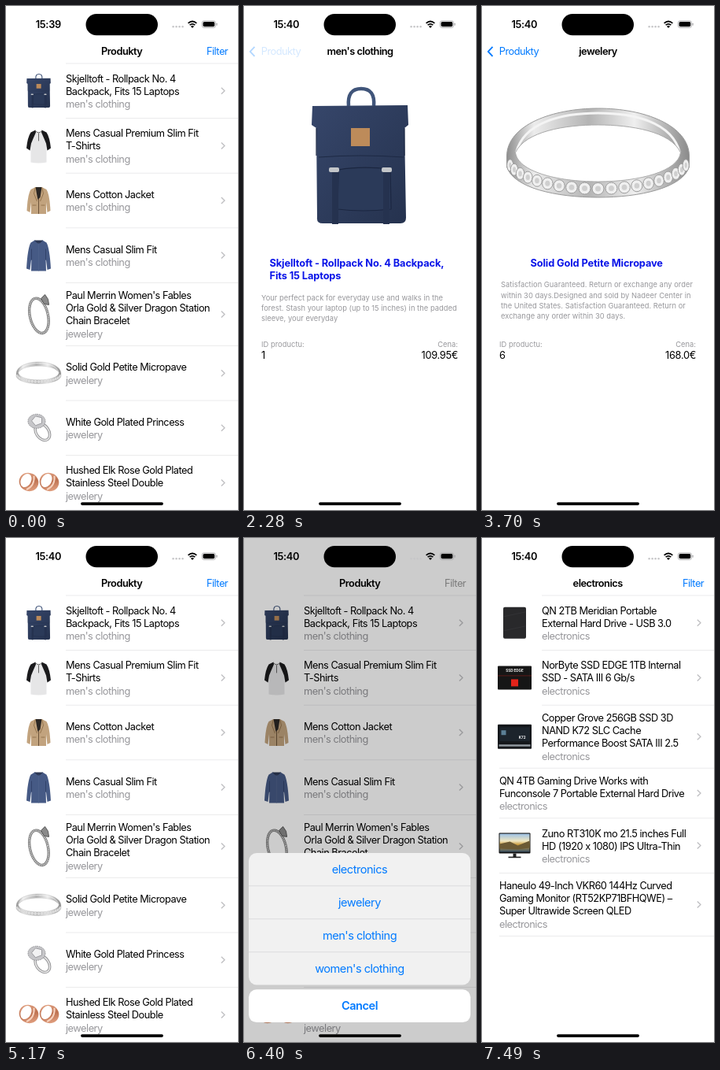
An HTML page that plays this animation: 295x640 px, repeating every 8000 ms.

```html
<!DOCTYPE html>
<html lang="en">
<head>
<meta charset="utf-8">
<style>
  html, body { margin: 0; width: 100%; height: 100%; overflow: hidden; background: #fff; }
  svg { display: block; width: 295px; height: 640px; }
  text { font: 12.8px Inter, "Liberation Sans", sans-serif; letter-spacing: -.5px; white-space: pre; }
  .grey { fill: #97979b; }
  .blue { fill: #007aff; }
  .bold { font-weight: 600; }
  .head { font-weight: 700; letter-spacing: -.12px; fill: #0a14e8; }
  .small { font-size: 9.3px; letter-spacing: .05px; fill: #97979b; }
  .price { letter-spacing: -.3px; }
  .action { font-size: 14.6px; letter-spacing: -.5px; fill: #007aff; }
  .tiny { font-size: 4.5px; font-weight: 700; letter-spacing: 0; fill: #fff; }
</style>
</head>
<body>
<svg id="stage" viewBox="0 0 295 640">
  <defs>
    <linearGradient id="denim" x2="1" y2="1"><stop stop-color="#36466a"/><stop offset="1" stop-color="#25324e"/></linearGradient>
    <linearGradient id="silver"><stop stop-color="#8e8e8e"/><stop offset=".15" stop-color="#ececec"/><stop offset=".45" stop-color="#b4b4b4"/><stop offset=".7" stop-color="#efefef"/><stop offset="1" stop-color="#8a8a8a"/></linearGradient>
    <linearGradient id="rose" x2="1" y2="1"><stop stop-color="#f0b698"/><stop offset=".5" stop-color="#bd7150"/><stop offset="1" stop-color="#eeb192"/></linearGradient>
    <linearGradient id="view" x2="0" y2="1"><stop stop-color="#9cc0e4"/><stop offset=".4" stop-color="#efe6c0"/><stop offset=".6" stop-color="#c99a3c"/><stop offset="1" stop-color="#3c5468"/></linearGradient>
  </defs>
  <g id="list"></g>
  <rect id="shade" width="295" height="640"/>
  <g id="detail"></g>
  <g id="nav"></g>
  <rect id="dim" width="295" height="640"/>
  <g id="status"></g>
  <g id="sheet"></g>
  <rect x="95" y="630.3" width="105" height="3.6" rx="1.8"/>
</svg>
<script>
const $ = id => document.getElementById(id);
const set = (id, attrs) => { for (const k in attrs) $(id).setAttribute(k, attrs[k]); };
const show = (id, on) => set(id, { display: on ? 'inline' : 'none' });
const text = (x, y, s, cls = '', anchor = 'start', extra = '') =>
  `<text x="${x}" y="${y}" class="${cls}" text-anchor="${anchor}" ${extra}>${s.replace('&', '&amp;')}</text>`;
const rect = (x, y, w, h, fill, rx = 0, extra = '') =>
  `<rect x="${x}" y="${y}" width="${w}" height="${h}" rx="${rx}" fill="${fill}" ${extra}/>`;
const path = (d, fill, stroke = 'none', w = 1, extra = '') =>
  `<path d="${d}" fill="${fill}" stroke="${stroke}" stroke-width="${w}" stroke-linejoin="round" ${extra}/>`;
const oval = (x, y, rx, ry, fill, extra = '') =>
  `<ellipse cx="${x}" cy="${y}" rx="${rx}" ry="${ry}" fill="${fill}" ${extra}/>`;
const both = s => s + `<g transform="scale(-1 1)">${s}</g>`;
const place = (x, y, s, scale = 1) => `<g transform="translate(${x} ${y}) scale(${scale})">${s}</g>`;

// Large pictures, centred on 0,0
const backpack = place(-147.5, -190.5,
  path('M133 127Q131 105 149 105Q167 105 165 127', 'none', '#40557a', 4.5) +
  path('M87 127L208 126L209 151L204 155L206 269Q206 276 199 276L100 276Q92 276 93 268L92 155L86 151Z', 'url(#denim)') +
  path('M92 155L92 190M204 155L204 190M95 192Q148 188 203 192', 'none', '#1d2944', 1.2) +
  path('M120 208Q148 203 186 207L187 258Q150 262 119 258Z', '#2b3a59', '#1b2640', 1.2) +
  rect(112, 206, 8, 71, '#25324f') + rect(177, 206, 8, 71, '#25324f') +
  rect(108, 205, 13, 6, '#c3c6c9', 2) + rect(175, 205, 13, 6, '#c3c6c9', 2) +
  rect(136, 155, 24, 23, '#bd8b5a'));

let stones = '';
for (let i = -9; i <= 9; i++) {
  const a = i * .148, c = Math.cos(a), x = 115 * Math.sin(a), y = 5 + 39 * c;
  stones += oval(x, y, 3 + 4.5 * c, 7.5, '#f0f0f0', 'stroke="#9c9c9c"') + oval(x, y, 1 + 2.5 * c, 3.5, '#cfcfcf');
}
const ring =
  path('M-116 3C-116-37-57-58 0-58C58-58 116-37 116 3L116 16C108 43 53 55 0 55C-53 55-108 43-116 16Z', 'url(#silver)', '#999') +
  path('M-104-2C-94-41-45-52 0-52C45-52 94-41 104-2', 'none', '#f4f4f4', 3) +
  path('M-105-2C-92-29-42-37 0-37C42-37 92-29 105-2C102 22 53 35 0 35C-53 35-102 22-105-2Z', '#fff', '#aaa') + stones;

// Small pictures, centred on 0,0
const raglan = path('M-5-18L5-18L10-8L10 21Q0 23-10 21L-10-8Z', '#e6e6e7') +
  both(path('M-4-20L-10-17Q-14-11-15.5 3L-11 6L-9.5-3L-7-9L-3.5-17Z', '#1a1a1c')) +
  path('M-4-19Q0-14 4-19M0-16V-6', 'none', '#666');
const jacket = both(path('M-4-17L-10-14Q-14-8-15 13L-11 15L-9.5 2L-9.5 17L.3 17L.3-12Z', '#c2a37e')) +
  path('M-4-17L4-17L2-4L-1-1L-2-6Z', '#2b2724') + path('M0-2V17', 'none', '#6b5238') +
  both(path('M-4-17L-6-9L-2 1M-8 6L-3 6', 'none', '#94754f'));
const sweater = both(path('M-5-19L-10-16Q-14-9-15.5 17L-11 18.5L-9 2L-9.5 20L.3 20L.3-17Z', '#465a85')) +
  path('M-5-19Q0-12 5-19', '#2c3855', '#2c3855') + both(path('M-9-8L-9 6', 'none', '#31426a'));
const chain = `<g transform="rotate(-13)">` +
  oval(0, 2, 11.5, 22.5, 'none', 'stroke="#7d7d7d" stroke-width="3.4"') +
  oval(0, 2, 11.5, 22.5, 'none', 'stroke="#cfcfcf" stroke-width="2" stroke-dasharray="1.2 1"') + '</g>' +
  path('M3-20L8-25L12-19L13-12L7-13Z', '#8a8a8a', '#555');
const solitaire = `<g transform="rotate(-35)">` + oval(1, 7, 8, 11.5, 'none', 'stroke="#9a9a9c" stroke-width="3.6"') +
  oval(1, 7, 8, 11.5, 'none', 'stroke="#ececec" stroke-width="1.4"') + '</g>' +
  oval(-2.5, -8.5, 11, 9, '#c6c6c9', 'stroke="#88888c" stroke-dasharray="1.5 1"') +
  path('M-9-9L-4-15L4-13L4-6L-4-3Z', '#f2f2f3', '#9c9ca0');
const band = x => `<g transform="translate(${x} -1) rotate(28)">` + oval(0, 0, 12.5, 11.5, 'url(#rose)') +
  oval(-4, 0, 6.5, 9, '#fff') + path('M2-10Q9 0 2 10', 'none', '#f7d2be', 2) + '</g>';
const drive = rect(-14.5, -20, 29, 40, '#29292b', 2) + path('M-14-8L14-14M-14 10L14 4', 'none', '#333336');
const ssdRed = rect(-21.5, -15, 43, 30, '#161616', 1) + text(0, -7, 'SSD EDGE', 'tiny', 'middle') +
  rect(-21.5, -3, 43, 1, '#5a1a18') + rect(-4.5, 2, 9, 9, '#e2231a');
const ssdBlue = rect(-21.5, -15.5, 43, 31, '#14171b', 1) + rect(-19, -12, 38, 18, '#1c242c') +
  text(14, 3, 'K72', 'tiny', 'end') + rect(-20, 10, 40, 2.5, '#8f979e') + rect(-17, -8, 6, 6, '#5b7f95');
const monitor = rect(-20, -16, 40, 26, '#111', 1) + rect(-19, -15, 38, 23, 'url(#view)') +
  path('M-19-2L-6-5L4 0L19-6V3L4 5L-19 4Z', '#6b5a34') + rect(-2, 10, 4, 5, '#222') + rect(-8, 14, 16, 1.6, '#222');

const pic = (art, w, h, scale) => rect(-w / 2, -h / 2, w, h, '#fff') + place(0, 0, art, scale);
const men = "men's clothing", jewels = 'jewelery', tech = 'electronics';
const products = [
  ['Skjelltoft - Rollpack No. 4|Backpack, Fits 15 Laptops', men, pic(backpack, 32, 44, .249)],
  ['Mens Casual Premium Slim Fit|T-Shirts', men, raglan],
  ['Mens Cotton Jacket', men, jacket],
  ['Mens Casual Slim Fit', men, sweater],
  ["Paul Merrin Women's Fables|Orla Gold & Silver Dragon Station|Chain Bracelet", jewels, chain],
  ['Solid Gold Petite Micropave', jewels, pic(ring, 58, 31, .245)],
  ['White Gold Plated Princess', jewels, solitaire],
  ['Hushed Elk Rose Gold Plated|Stainless Steel Double', jewels, band(-12.5) + band(13.5)]
];
const gaming = ['QN 4TB Gaming Drive Works with|Funconsole 7 Portable External Hard Drive', tech];
const wide = ['Haneulo 49-Inch VKR60 144Hz Curved|Gaming Monitor (RT52KP71BFHQWE) –|Super Ultrawide Screen QLED', tech];
// The same rows before and after their pictures load
const bare = [
  ['QN 2TB Meridian Portable External|Hard Drive - USB 3.0', tech],
  ['NorByte SSD EDGE 1TB Internal SSD -|SATA III 6 Gb/s', tech],
  ['Copper Grove 256GB SSD 3D NAND|K72 SLC Cache Performance Boost|SATA III 2.5', tech],
  gaming,
  ['Zuno RT310K mo 21.5 inches Full HD|(1920 x 1080) IPS Ultra-Thin', tech],
  wide
];
const gadgets = [
  ['QN 2TB Meridian Portable|External Hard Drive - USB 3.0', tech, drive],
  ['NorByte SSD EDGE 1TB Internal|SSD - SATA III 6 Gb/s', tech, ssdRed],
  ['Copper Grove 256GB SSD 3D|NAND K72 SLC Cache|Performance Boost SATA III 2.5', tech, ssdBlue],
  gaming,
  ['Zuno RT310K mo 21.5 inches Full|HD (1920 x 1080) IPS Ultra-Thin', tech, monitor],
  wide
];

const line = (x, y) => rect(x, y - .4, 295 - x, .8, '#e6e6e8');
function rows(items) {
  let top = 73, out = '';
  items.forEach(([name, kind, art], i) => {
    const lines = name.split('|'), n = lines.length, x = art ? 76 : 22;
    const h = n > 2 ? 80 : art ? 69.6 : 63.6, cy = top + h / 2, base = cy + 5 - 8 * n;
    if (!i) out += line(x, top);
    if (art) out += place(41.5, cy, art);
    lines.forEach((s, j) => out += text(x, base + 16 * j, s));
    out += text(x, base + 16 * n + .3, kind, 'grey') +
      path(`M273.8 ${cy - 4}l4.2 4l-4.2 4`, 'none', '#c0c0c3', 1.4);
    top += h;
    const next = items[i + 1];
    out += line(next && !next[2] ? 22 : x, top);
  });
  return out;
}

const page = (id, art, head, headX, info, infoX, infoY, no, price) =>
  `<g id="${id}">` + art +
  head.map((s, i) => text(headX, 331 + 16 * i, s, 'head')).join('') +
  info.map((s, i) => text(infoX, infoY + 13.2 * i, s, 'small')).join('') +
  text(22, 433, 'ID productu:', 'small') + text(272, 433, 'Cena:', 'small', 'end') +
  text(22, 447.8, no, 'price') + text(272, 447.8, price, 'price', 'end') + '</g>';

$('list').innerHTML = rect(0, 0, 295, 640, '#fff') + rect(0, 0, 295, 69.6, '#d0d0d2', 0, 'id="mark"') +
  `<g id="all">${rows(products)}</g><g id="bare">${rows(bare)}</g><g id="found">${rows(gadgets)}</g>`;

$('detail').innerHTML = rect(0, 0, 295, 640, '#fff') +
  page('page0', place(147.5, 190.5, backpack), ['Skjelltoft - Rollpack No. 4 Backpack,', 'Fits 15 Laptops'], 32.5,
    ['Your perfect pack for everyday use and walks in the', 'forest. Stash your laptop (up to 15 inches) in the padded',
      'sleeve, your everyday'], 22, 373.5, '1', '109.95€') +
  page('page1', place(147.5, 188, ring), ['Solid Gold Petite Micropave'], 61.5,
    ['Satisfaction Guaranteed. Return or exchange any order', 'within 30 days.Designed and sold by Nadeer Center in',
      'the United States. Satisfaction Guaranteed. Return or', 'exchange any order within 30 days.'], 24, 357.3, '6', '168.0€');

$('nav').innerHTML = text(147.5, 62.3, 'Produkty', 'bold', 'middle', 'id="title"') +
  text(147.5, 62.3, '', 'bold', 'middle', 'id="kind"') +
  `<g id="arrow">${path('M13.5 51.8L7.8 57.8L13.5 63.8', 'none', '#007aff', 1.9)}</g>` +
  text(47, 62.3, 'Produkty', 'blue', 'middle', 'id="back"') +
  text(282.2, 62.3, 'Filter', '', 'end', 'id="filter"');

let dots = '';
for (let i = 0; i < 4; i++) dots += oval(212.6 + 4 * i, 26.3, 1.2, 1.2, '#c6c6c8');
$('status').innerHTML = rect(101.5, 10, 91.5, 27.3, '#000', 13.6) + dots +
  text(53.8, 28, '15:39', 'bold price', 'middle', 'id="clock"') +
  path('M231.6 21.8Q237 17.2 242.4 21.8M233.6 24.2Q237 21.4 240.4 24.2', 'none', '#000', 1.7) +
  path('M237 28L234.9 25.8Q237 24.3 239.1 25.8Z', '#000') +
  rect(249.2, 18.8, 17.4, 8.8, 'none', 2.8, 'stroke="#a5a5a7" stroke-width=".8"') +
  rect(250.5, 20.1, 14.8, 6.2, '#000', 1.7) + rect(267.5, 21.7, 1.1, 3, '#a5a5a7', .5);

$('sheet').innerHTML = rect(6, 400, 282, 167.5, '#f1f1f1', 10) +
  path('M6 441.8V410Q6 400 16 400H278Q288 400 288 410V441.8Z', '#dcdcde', 'none', 0, 'id="press"') +
  [tech, jewels, men, "women's clothing"].map((s, i) =>
    text(147, 426.3 + 42 * i, s, 'action', 'middle') + (i ? rect(6, 399.5 + 42 * i, 282, .7, '#d2d2d4') : '')).join('') +
  rect(6, 573.3, 282, 41.8, '#fff', 10) + text(147, 599.3, 'Cancel', 'action bold', 'middle');

// Screen updates come in held steps; each follows a damped spring.
const step = (t, [a, b], n) => Math.max(0, Math.min(n - 1, Math.floor((t - a) / (b - a) * (n - 1) + 1e-6)));
const spring = k => k <= 0 ? 0 : 1 - (1 + 1.54 * k) * Math.exp(-1.54 * k);
const leave = k => k < 5 ? 1 - spring(k - 1) : 0;
const visits = [
  { push: [1160, 1680], settle: 1880, pop: [2170, 2730], top: 73, kind: men },
  { push: [2970, 3530], settle: 3700, pop: [4590, 5170], top: 431.4, kind: jewels }
];
const opening = [5970, 6400], closing = [6630, 7160];

function draw(t) {
  const n = t < visits[1].push[0] ? 0 : 1, v = visits[n];
  const popping = t >= v.pop[0], k = step(t, v.pop, 6);
  const p = t < v.push[0] ? 0 : popping ? leave(k) : t < v.settle ? spring(step(t, v.push, 6)) : 1;
  const pressed = popping && k < 2;

  set('list', { transform: `translate(${-88 * p})` });
  set('shade', { opacity: .1 * p });
  set('detail', { transform: `translate(${295 * (1 - p)})` });
  set('mark', { y: v.top, opacity: t < v.push[0] ? 0 : popping ? p : 1 });
  show('page0', n === 0);
  show('page1', n === 1);

  const x = 147.2 - 100.2 * p;
  set('title', { x, opacity: Math.max(0, 1 - 2 * p) });
  set('back', { x, opacity: Math.max(0, 2 * p - 1) * (pressed ? .17 : 1) });
  set('arrow', { opacity: p * (pressed ? .3 : 1) });
  set('kind', { x: 147.5 + 110 * (1 - p), opacity: p });
  $('kind').textContent = v.kind;

  const c = step(t, closing, 6), o = step(t, opening, 5);
  const s = t < opening[0] ? 0 : t >= closing[0] ? leave(c) : o < 4 ? spring(o + .5) : 1;
  set('sheet', { transform: `translate(0 ${245 * (1 - s)})` });
  show('sheet', s > 0);
  show('press', t >= closing[0] && c < 2);
  set('dim', { opacity: .2 * s });
  set('filter', { fill: s > 0 ? '#999' : '#007aff', opacity: t >= 5710 && t < opening[0] ? .3 : 1 - p });

  $('title').textContent = t >= closing[0] && c > 2 ? tech : 'Produkty';
  $('clock').textContent = t < visits[0].settle ? '15:39' : '15:40';
  show('all', t < 7340);
  show('bare', t >= 7340 && t < 7490);
  show('found', t >= 7490);
}

function tick(now) {
  draw(now % 8000);
  requestAnimationFrame(tick);
}
draw(0);
requestAnimationFrame(tick);
</script>
</body>
</html>
```
